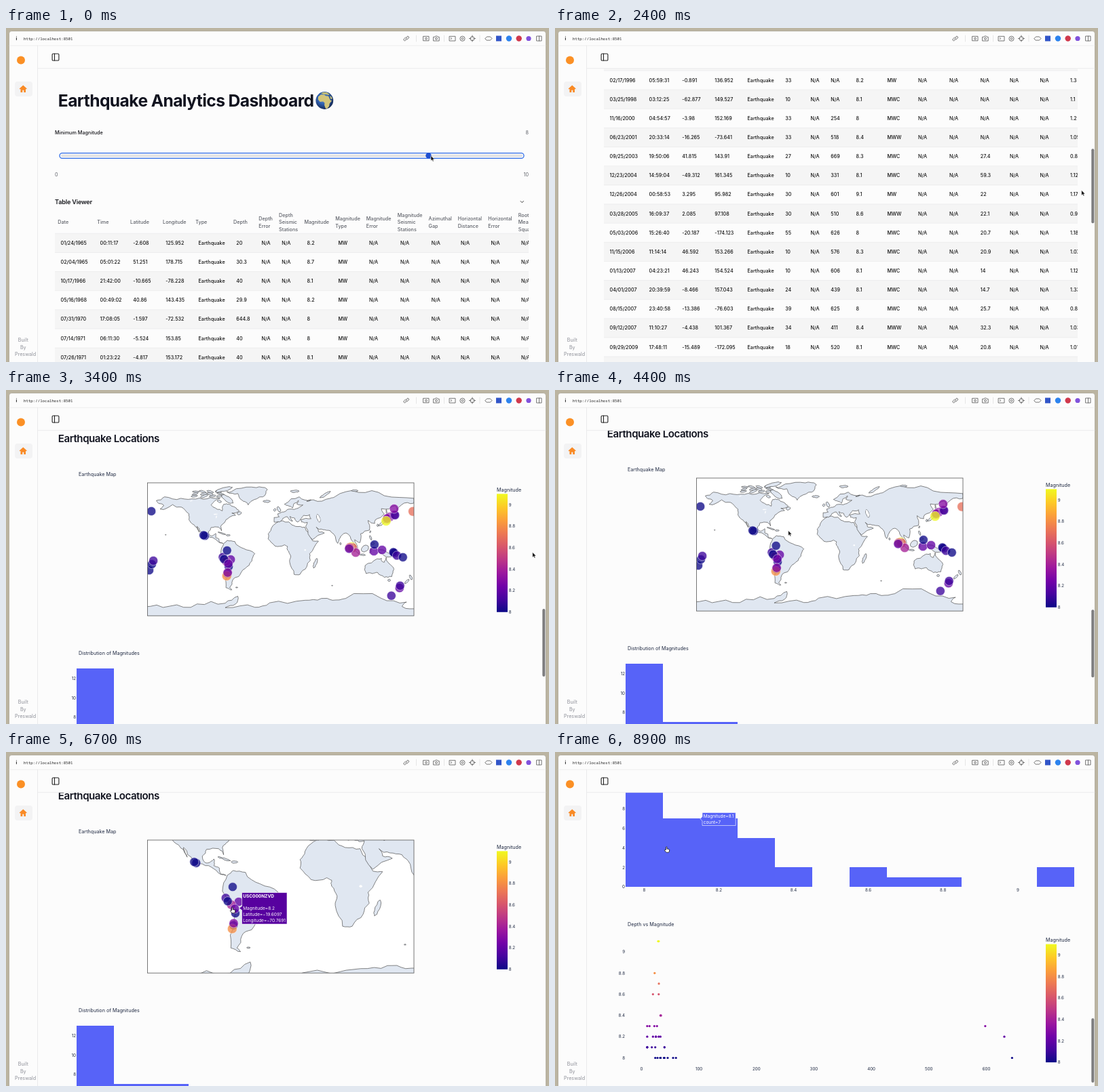
Write an HTML page that moves like this. It is 800 by 493 pixels and loops after 9000 ms.

```html
<!DOCTYPE html>
<html lang="en">
<head>
<meta charset="utf-8">
<title>Earthquake Analytics Dashboard</title>
<style>
html, body { margin: 0; width: 100%; height: 100%; overflow: hidden; background: #bbb4a1; }
svg { display: block; width: 100%; height: 100%; }
text { font-family: Inter, "Open Sans", sans-serif; white-space: pre; }
.land path { fill: #e0e7f1; stroke: #444; stroke-width: .65; stroke-linejoin: round; vector-effect: non-scaling-stroke; }
.land .lake { fill: #fff; stroke: none; }
</style>
</head>
<body>
<svg id="stage" viewBox="0 0 800 493"></svg>
<script>
const stage = document.getElementById('stage');

function add(parent, tag, attrs = {}) {
  const el = document.createElementNS('http://www.w3.org/2000/svg', tag);
  for (const k in attrs) el.setAttribute(k, attrs[k]);
  parent.appendChild(el);
  return el;
}
const group = (parent, attrs) => add(parent, 'g', attrs);
const rect = (parent, x, y, width, height, fill, more) =>
  add(parent, 'rect', { x, y, width, height, fill, ...more });
const circle = (parent, cx, cy, r, fill, more) => add(parent, 'circle', { cx, cy, r, fill, ...more });
const line = (parent, d, stroke, width = 1) =>
  add(parent, 'path', { d, stroke, fill: 'none', 'stroke-width': width, 'stroke-linecap': 'round', 'stroke-linejoin': 'round' });
// y is the vertical middle of the capitals
function text(parent, x, y, str, size = 7.2, fill = '#15151a', more = {}) {
  const el = add(parent, 'text', { x, y: y + size * .36, 'font-size': size, fill, ...more });
  el.textContent = str;
  return el;
}
function clip(id, x, y, w, h) {
  rect(add(stage, 'clipPath', { id }), x, y, w, h, '#000');
  return `url(#${id})`;
}
function seeded(seed) {
  return () => (seed = seed * 16807 % 2147483647) / 2147483647;
}
const END = { 'text-anchor': 'end' }, MID = { 'text-anchor': 'middle' };
const MEDIUM = { 'font-weight': 500 }, CELL = { 'font-weight': 500, 'letter-spacing': '.005em' };
const INK = '#1f2942', GRAY = '#5d6068', BLUE = '#5763f8';

// date latitude longitude depth magnitude, then optionally time type stations gap rms
const catalogue = `
01/24/1965 -2.608 125.952 20 8.2 00:11:17 MW - - -
02/04/1965 51.251 178.715 30.3 8.7 05:01:22 MW - - -
10/17/1966 -10.665 -78.228 40 8.1 21:42:00 MW - - -
05/16/1968 40.86 143.435 29.9 8.2 00:49:02 MW - - -
07/31/1970 -1.597 -72.532 644.8 8 17:08:05 MW - - -
07/14/1971 -5.524 153.85 40 8 06:11:30 MW - - -
07/26/1971 -4.817 153.172 40 8.1 01:23:22 MW - - -
12/02/1972 6.405 126.64 60 8 00:19:52 MW - - -
01/14/1976 -28.427 -177.657 33 8 16:47:34 MS - - -
03/03/1985 -33.135 -71.871 33 8 22:47:07 MW - - 1
09/19/1985 18.19 -102.533 27.9 8
05/07/1986 51.52 -174.776 33 8
05/23/1989 -52.341 160.568 10 8.2
06/09/1994 -13.841 -67.553 631.3 8.2
10/04/1994 43.773 147.321 14 8.3
07/30/1995 -23.34 -70.294 45.6 8
10/09/1995 19.055 -104.205 33 8
02/17/1996 -0.891 136.952 33 8.2 05:59:31 MW - - 1.3
03/25/1998 -62.877 149.527 10 8.1 03:12:25 MWC - - 1.1
11/16/2000 -3.98 152.169 33 8 04:54:57 MWC 254 - 1.2
06/23/2001 -16.265 -73.641 33 8.4 20:33:14 MWW 518 - 1.05
09/25/2003 41.815 143.91 27 8.3 19:50:06 MWC 669 27.4 0.87
12/23/2004 -49.312 161.345 10 8.1 14:59:04 MWC 331 59.3 1.12
12/26/2004 3.295 95.982 30 9.1 00:58:53 MW 601 22 1.17
03/28/2005 2.085 97.108 30 8.6 16:09:37 MWW 510 22.1 0.96
05/03/2006 -20.187 -174.123 55 8 15:26:40 MWC 626 20.7 1.18
11/15/2006 46.592 153.266 10 8.3 11:14:14 MWC 576 20.9 1.07
01/13/2007 46.243 154.524 10 8.1 04:23:21 MWC 606 14 1.12
04/01/2007 -8.466 157.043 24 8.1 20:39:59 MWC 439 14.7 1.33
08/15/2007 -13.386 -76.603 39 8 23:40:58 MWC 625 25.7 0.88
09/12/2007 -4.438 101.367 34 8.4 11:10:27 MWW 411 32.3 1.03
09/29/2009 -15.489 -172.095 18 8.1 17:48:11 MWC 520 20.8 1.01
02/27/2010 -36.122 -72.898 22.9 8.8
03/11/2011 38.297 142.373 29 9.1
04/11/2012 2.327 93.063 20 8.6
04/11/2012 0.802 92.463 25.1 8.2
02/06/2013 -10.799 165.114 24 8
05/24/2013 54.892 153.221 598.1 8.3
04/01/2014 -19.6097 -70.7691 25 8.2
09/16/2015 -31.5729 -71.6744 22.4 8.3`;

const pick = seeded(77);
const upTo = n => Math.floor(pick() * n);
const two = n => String(n).padStart(2, '0');

// Fills the optional fields with what was usual in that year
function usualDetails(year) {
  const modern = year > 2003;
  return [
    [24, 60, 60].map(n => two(upTo(n))).join(':'),
    modern ? 'MWW' : 'MW',
    modern ? 330 + upTo(300) : '-',
    modern ? 14 + upTo(120) / 10 : '-',
    (1 + pick() * .3).toFixed(1)
  ];
}
const quakes = catalogue.trim().split('\n').map(row => {
  const [date, lat, lon, depth, mag, ...given] = row.split(' ');
  const [time, type, stations, gap, rms] = given.length ? given : usualDetails(+date.slice(-4));
  const cells = [date, time, lat, lon, 'Earthquake', depth, '-', stations, mag, type, '-', '-', gap, '-', '-', rms];
  return { lat: +lat, lon: +lon, depth: +depth, mag: +mag, cells: cells.map(c => c === '-' ? 'N/A' : c) };
});

const plasma = ['#0d0887', '#46039f', '#7201a8', '#9c179e', '#bd3786',
  '#d8576b', '#ed7953', '#fb9f3a', '#fdca26', '#f0f921'];
function magColor(mag) {
  const p = Math.min(.9999, Math.max(0, (mag - 8) / 1.1)) * 9, i = Math.floor(p);
  const part = (c, n) => parseInt(plasma[c].substr(1 + 2 * n, 2), 16);
  return `rgb(${[0, 1, 2].map(n => Math.round(part(i, n) + (part(i + 1, n) - part(i, n)) * (p - i)))})`;
}

const defs = add(stage, 'defs');
function gradient(tag, id, attrs, colors) {
  const g = add(defs, tag, { id, ...attrs });
  colors.forEach((c, i) => add(g, 'stop', { offset: i / (colors.length - 1), 'stop-color': c }));
}
gradient('linearGradient', 'bar', { x1: 0, y1: 1, x2: 0, y2: 0 }, plasma);
gradient('radialGradient', 'sea', { cx: .42, cy: .38, r: .65 }, ['#6ba0dc', '#2f5fae', '#13254f']);

// Window
rect(stage, 0, 0, 800, 493, '#bbb4a1');
rect(stage, 4.5, 4.5, 791, 500, '#fcfcfc', { rx: 4, stroke: '#9b9585', 'stroke-width': .6 });
const page = group(stage, { 'clip-path': clip('view', 47, 60, 748, 433) });
const scroll = group(page);

function drawToolbar() {
  text(stage, 14.4, 15.8, 'i', 6.5, '#222', { 'font-weight': 700 });
  text(stage, 26, 15.6, 'http://localhost:8501', 5.75, '#222',
    { style: 'font-family:"Noto Sans Mono",monospace', 'font-weight': 500 });
  line(stage, 'M5 26H795', '#e9e9e9', .8);
  line(stage, 'M604.5 11V20M645.5 11V20M698 11V20', '#ddd', .7);
  const c = '#555';
  line(stage, 'M589 14.5l1.8-1.8a1.6 1.6 0 0 1 2.3 2.3l-1.8 1.8M590.5 16.5l-1.8 1.8a1.6 1.6 0 0 1-2.3-2.3l1.8-1.8M588.5 16.7l2.6-2.6', c, .8);
  line(stage, 'M615 12.3h8v6.5h-8zM630 13.2h1.8l1-1.2h2.6l1 1.2h1.8v5.8h-8.2zM653.5 12.3h8.5v6.7h-8.5zM655.3 14.3l1.4 1.2-1.4 1.2', c, .8);
  for (const [x, r] of [[619, 1.4], [634, 1.5], [672.5, 3.6], [672.5, 1.4], [687, 3]])
    circle(stage, x, 15.7, r, 'none', { stroke: c, 'stroke-width': .8 });
  line(stage, 'M687 11v2.5M687 17.5V20M682.5 15.5h2.5M689 15.5h2.5', c, .8);
  line(stage, 'M706 15.5l2.5-2.6h5l2.5 2.6-2.5 2.6h-5zM782 12h7v7h-7zM785.5 12v7', c, .8);
  rect(stage, 722, 11.5, 8, 8, '#3155c8');
  circle(stage, 741, 15.5, 4.2, '#2d83ee');
  circle(stage, 755.7, 15.5, 4.2, '#d0384c');
  circle(stage, 770, 15.5, 3.6, '#8052dc');
}

function drawSidebar() {
  line(stage, 'M46.5 26V493M47 59.7H795', '#e6e6e8', .8);
  circle(stage, 22, 47.5, 6, '#fb9025');
  rect(stage, 13, 79, 26, 22, '#f3f3f4', { rx: 4 });
  add(stage, 'path', { d: 'M25.3 84.4L19.7 89.6l.8.9 1-.8V95h2.8v-3.2h2V95H29v-5.3l1 .8.8-.9z', fill: '#f98a25' });
  rect(stage, 68.1, 38, 9.8, 10, 'none', { rx: 1.3, stroke: '#222', 'stroke-width': 1.1 });
  line(stage, 'M71.5 38v10', '#222', 1.1);
  text(stage, 25.3, 460.5, 'Built', 7.2, '#8f9199', MID);
  text(stage, 25.3, 471, 'By', 7.2, '#8f9199', MID);
  text(stage, 13, 481.8, 'Preswald', 7.2, '#8f9199');
}

function drawIntro() {
  text(scroll, 76.8, 107.2, 'Earthquake Analytics Dashboard', 24.6, '#11131f',
    { 'font-weight': 700, 'letter-spacing': '-.024em' });
  circle(scroll, 469.3, 107, 12.9, 'url(#sea)');
  add(scroll, 'path', { d: 'M460 101.5l4-3.2 5 .2 2 1.8 4 .3 2.8 6 2.3.6-3.4 4.4-.6 4-3 3.5-2.4-.5-1.6-4.5.3-3.6-2.3-2-4.5.4-2.8-3.3z', fill: '#d3c57a' });
  add(scroll, 'path', { d: 'M464 96.5l3.5-1.7 5 .3 4.5 2.8-2 1-4-1-2.7.2zM477 100l3 2 .6 2.8-2.2.2z', fill: '#c2bd78' });
  text(scroll, 72, 154.6, 'Minimum Magnitude', 7.25, '#15151a', MEDIUM);
  text(scroll, 770, 154.6, '8', 7.2, GRAY, END);
  rect(scroll, 79, 184.6, 684, 7.8, '#fff', { rx: 3.9, stroke: '#2d6be6', 'stroke-width': 1.3 });
  rect(scroll, 80.8, 186.4, 680.4, 4.2, '#e2e2e4', { rx: 2.1 });
  text(scroll, 72, 216, '0', 7.2, GRAY);
  text(scroll, 770, 216, '10', 7.2, GRAY, END);
  text(scroll, 72, 256.4, 'Table Viewer', 9.15, '#17181d', { 'font-weight': 600, 'letter-spacing': '-.02em' });
  line(scroll, 'M758.2 255.6l2.1 2.1 2.1-2.1', '#333', 1);
  return circle(scroll, 622.5, 188.4, 4.2, '#2f62ea');
}

function drawTable() {
  const cols = [[80.5, 'Date'], [138.5, 'Time'], [187.3, 'Latitude'], [235.3, 'Longitude'], [283.5, 'Type'],
    [339.3, 'Depth'], [376.5, 'Depth Error'], [406.3, 'Depth Seismic Stations'], [443.6, 'Magnitude'],
    [489.4, 'Magnitude Type'], [535, 'Magnitude Error'], [581, 'Magnitude Seismic Stations'],
    [626.8, 'Azimuthal Gap'], [670, 'Horizontal Distance'], [714.5, 'Horizontal Error'], [759, 'Root Mean Square']];
  const rows = group(group(scroll, { 'clip-path': clip('table', 72, 268, 698, 899) }));
  for (const [x, title] of cols) {
    const words = title.split(' ');
    words.forEach((w, n) => text(rows, x - 4.2, 286.7 + (n - (words.length - 1) / 2) * 10.5, w, 7.2, GRAY, MEDIUM));
  }
  quakes.forEach((q, r) => {
    const y = 303.3 + r * 28.14;
    if (r % 2 === 0) rect(rows, 72, y, 698, 28.14, '#f5f5f5');
    line(rows, `M72 ${y}H770`, '#e6e6e8', .6);
    q.cells.forEach((c, i) => text(rows, cols[i][0], y + 14, c, 7.15, '#111', CELL));
  });
  return rows;
}

// Charts share a frame placed this far down the page
const CHARTS = 1139, MAP = { x: 404.75, y: 235.1, k: 1.0903 };

function drawWorld(parent) {
  const rand = seeded(2024);

  // Splits each edge at a point pushed sideways, so few corners give a rough coast
  function roughen(pts) {
    return pts.flatMap(([x, y], i) => {
      const [u, v] = pts[(i + 1) % pts.length];
      if (Math.hypot(u - x, v - y) < 1.6) return [[x, y]];
      const push = (rand() - .5) * .3;
      return [[x, y], [(x + u) / 2 - (v - y) * push, (y + v) / 2 + (u - x) * push]];
    });
  }
  function shape(pts, cls = '') {
    add(parent, 'path', { class: cls, d: 'M' + pts.map(([x, y]) => `${x.toFixed(2)} ${(-y).toFixed(2)}`).join('L') + 'Z' });
  }
  function land(...n) {
    const pts = [];
    for (let i = 0; i < n.length; i += 2) pts.push([n[i], n[i + 1]]);
    shape(roughen(roughen(pts)));
  }
  // An oval given by its middle, length, width and tilt in degrees
  function oval(lon, lat, length, width, tilt, cls) {
    const a = tilt * Math.PI / 180, pts = [];
    for (let t = 0; t < 6.2; t += Math.PI / 4) {
      const x = Math.cos(t) * length / 2, y = Math.sin(t) * width / 2;
      pts.push([lon + x * Math.cos(a) - y * Math.sin(a), lat + x * Math.sin(a) + y * Math.cos(a)]);
    }
    shape(roughen(pts), cls);
  }
  const lake = (lon, lat, length, width, tilt) => oval(lon, lat, length, width, tilt, 'lake');

  // North America
  land(-168,66, -157,71, -135,69, -115,68, -95,70, -82,69, -94,60, -82,54, -79,52, -77,61, -70,61, -62,57,
    -56,52, -66,49, -61,46, -70,43, -76,36, -81,31, -80,25, -84,30, -94,29.5, -97.5,24, -95,18.5, -91,19,
    -88,21.5, -88,16, -83.5,14, -82,9, -78,8, -86,12, -95,16, -105,20, -113,31, -110,23, -117,33, -124,40,
    -124,48, -134,57, -146,60.5, -163,54.5, -158,59, -165,62);
  // South America
  land(-77,8, -72,12, -62,10.5, -50,1, -35,-6, -39,-16, -48,-26, -57,-37, -65,-42, -69,-52, -66,-55, -74,-52,
    -73,-38, -70,-19, -76,-14, -81,-5);
  // Africa
  land(-17,21, -17,14, -8,4.5, 5,6, 9,4, 9,-1, 13.5,-9, 12,-17, 18,-34, 26,-34, 35,-24, 40,-15, 39,-6, 51,11,
    43,11.5, 32.5,30, 20,31, 11,37, -6,35.7, -13,27.7);
  // Eurasia
  land(-9,43, -9,37, -2,37, 3,42, 9,44, 16,38, 12.5,44.5, 19,42, 23,37, 28,42, 31,46, 39,47, 41,41.5, 27,40,
    28,37, 36,36.5, 34,30, 43,13, 59,22, 51,24, 48,30, 57,26.5, 67,25, 72,20, 77,8, 80,15, 88,22, 94,17,
    98.5,8, 104,1.5, 100,13, 107,9, 108,21, 120,26, 118,39, 127,35, 128,40, 140,48, 136,55, 155,59,
    157,51, 163,60, 180,62.5, 180,69, 140,72.5, 105,77, 73,71, 67,69, 44,67, 35,65, 41,67, 25,71, 5,61,
    10,59, 16,56, 18,62, 24,66, 22,61, 30,60, 21,55, 9,54, -1,49, -4,48, -2,44);
  // Antarctica
  land(-185,-78, -150,-77, -113,-74, -75,-73, -58,-63.5, -61,-74, -75,-79, -35,-78.5, -15,-72.5, 33,-69,
    55,-66.5, 70,-69, 88,-66.5, 135,-66, 170,-71.5, 164,-77.5, 185,-78, 185,-110, -185,-110);
  // Australia
  land(114,-22, 115.5,-33, 124,-33, 131,-31.5, 140,-38, 150,-37, 153,-27, 146,-19, 142.5,-11, 140,-17.5,
    136,-15, 136,-12, 130,-13);
  // Greenland
  land(-73,78, -60,82, -33,83.5, -18,81, -24,71, -40,65, -44,60, -53,67, -58,75.5);

  for (let i = 0; i < 12; i++)
    oval(-118 + i % 4 * 11 + rand() * 4, 72 + Math.floor(i / 4) * 3, 8 + rand() * 4, 2 + rand(), rand() * 40 - 20);
  oval(-72, 68, 19, 7, -35);       // Baffin
  oval(-77, 81, 24, 5, 15);        // Ellesmere
  oval(-83, 65, 6, 3, -20);
  oval(60, 74, 17, 3, 30);         // Novaya Zemlya
  oval(19, 78.5, 12, 3, 0);        // Svalbard
  oval(100, 79.3, 9, 2, 0);
  oval(-2.5, 54, 8, 4, 115);       // Britain
  oval(-8, 53.3, 3.6, 3, 60);
  oval(-19, 65, 10, 3, 0);         // Iceland
  oval(-56, 48.8, 6, 4, 20);
  oval(-79.5, 21.6, 11, 1.5, -17); // Cuba
  oval(-71, 19, 5.5, 1.8, 0);
  oval(-59.5, -51.7, 3, 1, 0);
  oval(46.7, -19, 14, 4, 70);      // Madagascar
  oval(80.8, 7.6, 3.2, 1.8, 100);
  oval(69.5, -49.2, 1.6, .8, 0);
  oval(101, 0, 16, 4, -47);        // Sumatra
  oval(110, -7.3, 9, 1.6, -8);
  oval(113.8, 1, 11, 8, 40);       // Borneo
  oval(121, -2, 7, 2, 80);
  oval(140.5, -5.5, 21, 6, -24);   // New Guinea
  oval(121.5, 15.5, 6.5, 2.2, 110);
  oval(124.5, 7.6, 4, 3, 30);
  oval(121, 23.7, 3, 1.3, 70);
  oval(137.5, 36, 14, 3, 40);      // Japan
  oval(131, 32.5, 3.4, 2, 80);
  oval(142.8, 43.4, 5, 3, 10);
  oval(143, 50, 8, 1.4, 95);
  oval(146.5, -42, 3.5, 3, 0);
  oval(175.8, -38, 7, 3, 115);     // New Zealand
  oval(170.5, -43.7, 8, 2.6, 45);
  oval(-155.5, 19.6, 1.2, 1, 0);
  oval(51, 42, 11, 4, 108);        // Caspian
  lake(51, 42, 10.6, 3.6, 108);
  lake(33, -1, 2.5, 2.2, 0);
  lake(-88, 47.5, 6, 1.2, 5);
  lake(-87, 43.8, 4, 1.2, 80);
  lake(-121, 65.5, 4, 1, 20);
}

function colorBar(parent, top) {
  text(parent, 723, top - 6, 'Magnitude', 7.2, INK);
  rect(parent, 723, top, 16, 174.5, 'url(#bar)');
  for (let i = 0; i < 6; i++) text(parent, 740.8, top + 174.5 - i * 31.7, tick(i), 6.2, INK);
}
const tick = i => String(+(8 + i * .2).toFixed(1));

function tooltip(parent, x, y, w, h, fill, [tx, ty]) {
  const g = group(parent);
  add(g, 'path', {
    d: `M${tx} ${ty}L${x} ${ty - 3}V${y}H${x + w}V${y + h}H${x}V${ty + 3}Z`,
    fill, stroke: '#fff', 'stroke-width': .6
  });
  return g;
}

function drawCharts() {
  const g = group(scroll, { transform: `translate(0 ${CHARTS})` });
  text(g, 76.8, 71.6, 'Earthquake Locations', 15.1, '#11131f', { 'font-weight': 600, 'letter-spacing': '-.031em' });

  text(g, 107, 124, 'Earthquake Map', 7.2, INK);
  const frame = { x: 208.5, y: 137, width: 392.5, height: 196.2 };
  add(g, 'rect', { ...frame, fill: '#fff' });
  const map = group(g, { 'clip-path': clip('map', 208.5, 137, 392.5, 196.2) });
  const world = group(map, { class: 'land' });
  drawWorld(world);
  const dots = quakes.map(q => circle(map, 0, 0, 6.6 + (q.mag - 8) * .6, magColor(q.mag),
    { opacity: .77, stroke: '#fff', 'stroke-width': .6 }));
  add(g, 'rect', { ...frame, fill: 'none', stroke: '#555', 'stroke-width': .8 });
  colorBar(g, 153.3);

  text(g, 107, 388, 'Distribution of Magnitudes', 7.2, INK);
  const base = 598, unit = 14.36;
  for (let i = 0; i < 12; i++) {
    const n = quakes.filter(q => Math.round(q.mag * 10) === 80 + i).length;
    if (n) rect(g, 104 + i * 55.05, base - n * unit, 55.05, n * unit, BLUE, { 'shape-rendering': 'crispEdges' });
  }
  for (let v = 0; v <= 12; v += 2) text(g, 103, base - v * unit, v, 6.2, INK, END);
  for (let i = 0; i < 6; i++) text(g, 131.3 + i * 110.1, 603.2, tick(i), 6.2, INK, MID);

  text(g, 107, 653, 'Depth vs Magnitude', 7.2, INK);
  const depthX = d => 127.4 + d * .8468, magY = m => 850.5 - (m - 8) * 156.5;
  for (let i = 0; i < 6; i++) text(g, 103, magY(8 + i * .2), tick(i), 6.2, INK, END);
  for (let d = 0; d <= 600; d += 100) text(g, depthX(d), 867, d, 6.2, INK, MID);
  for (const q of quakes) circle(g, depthX(q.depth), magY(q.mag), 1.6, magColor(q.mag));
  colorBar(g, 682.6);

  const place = tooltip(g, 347.5, 214.5, 66.5, 46.5, '#57019f', [343.5, 237.5]);
  text(place, 349.2, 220, 'USC000NZVD', 6.5, '#fff', { 'font-weight': 700 });
  ['Magnitude=8.2', 'Latitude=\u221219.6097', 'Longitude=\u221270.7691']
    .forEach((s, i) => text(place, 349.2, 238 + i * 8.8, s, 6.5, '#fff'));
  const count = tooltip(g, 217, 488.5, 49.2, 19, BLUE, [213.8, 497.6]);
  text(count, 218.7, 493.6, 'Magnitude=8.1', 6.5, '#fff');
  text(count, 218.7, 502.3, 'count=7', 6.5, '#fff');
  return { world, dots, place, count };
}

const thumb = drawIntro();
const rows = drawTable();
const { world, dots, place, count } = drawCharts();
drawToolbar();
drawSidebar();
const bar = rect(stage, 790.3, 0, 4, 100, '#7d7d7f', { rx: 2 });
const arrow = add(stage, 'path', { d: 'M0 0V7.4L1.7 5.9 2.9 8.5 4.2 7.9 3 5.4H5.3Z', fill: '#111', stroke: '#fff', 'stroke-width': .5 });
const hand = add(stage, 'path', {
  d: 'M-1.5 .6V-3.4a.8.8 0 0 1 1.6 0V-1l2.7.5q1 .3.9 1.4L3.2 3.4q-.2.8-1 .8H-.6q-.6 0-1-.6L-3.6 1.2q-.2-1 .8-.9Z',
  fill: '#fff', stroke: '#111', 'stroke-width': .8
});

// Each step is [time, value, ...]
const tracks = {
  table: [[900, 0], [1300, 97], [1700, 262]],
  page: [[1800, 0], [2400, 456.7], [3000, 1100], [3300, 1139], [3700, 1139], [3900, 1146], [7200, 1146], [8000, 1538]],
  zoom: [[4900, 1], [6100, 1.64]],
  cursor: [[300, 626, 188.5], [900, 743.5, 279], [1600, 743.5, 279], [1900, 775.7, 239.5], [3700, 775.7, 239.5],
    [4300, 343.7, 207.5], [4500, 343.7, 207.5], [4900, 318, 262], [6000, 318, 262], [6400, 334, 233.5],
    [6800, 334, 233.5], [8300, 165, 144]]
};
// page scroll -> scrollbar top and height
const barSteps = [[0, 62, 120], [456, 178, 110], [1139, 323, 100], [1538, 393, 95]];

function sample(steps, t) {
  const i = steps.findIndex(s => s[0] > t);
  if (i === 0) return steps[0].slice(1);
  if (i < 0) return steps[steps.length - 1].slice(1);
  const a = steps[i - 1], b = steps[i], p = (t - a[0]) / (b[0] - a[0]);
  return a.slice(1).map((v, n) => v + (b[n + 1] - v) * p);
}
const show = (el, on) => el.setAttribute('visibility', on ? 'visible' : 'hidden');
const between = (t, a, b) => t >= a && t < b;

function render(t) {
  const [top] = sample(tracks.page, t), [inner] = sample(tracks.table, t);
  scroll.setAttribute('transform', `translate(0 ${-top})`);
  rows.setAttribute('transform', `translate(0 ${-inner})`);
  thumb.setAttribute('fill', t < 500 ? '#1f4fd0' : '#3568f0');

  const [z] = sample(tracks.zoom, t), k = MAP.k * z;
  const lon = -84.4 * (1 - 1 / z), lat = -45.5 * (1 - 1 / z);
  world.setAttribute('transform', `translate(${MAP.x} ${MAP.y}) scale(${k}) translate(${-lon} ${lat})`);
  quakes.forEach((q, i) => {
    dots[i].setAttribute('cx', MAP.x + (q.lon - lon) * k);
    dots[i].setAttribute('cy', MAP.y - (q.lat - lat) * k);
  });
  show(place, between(t, 6300, 7000));
  show(count, t >= 8300);

  const [y, h] = sample(barSteps, top);
  bar.setAttribute('y', y);
  bar.setAttribute('height', h);
  show(bar, between(t, 1800, 4600) || t >= 7200);

  const [cx, cy] = sample(tracks.cursor, t);
  const pointing = between(t, 900, 1700) || between(t, 6300, 7000) || t >= 8200;
  show(hand, pointing);
  show(arrow, !pointing);
  for (const c of [hand, arrow]) c.setAttribute('transform', `translate(${cx} ${cy})`);
}

const start = performance.now();
function frame() {
  const t = (performance.now() - start) % 9000;
  render(Math.floor(t / 100) * 100);
  requestAnimationFrame(frame);
}
frame();
</script>
</body>
</html>
```
